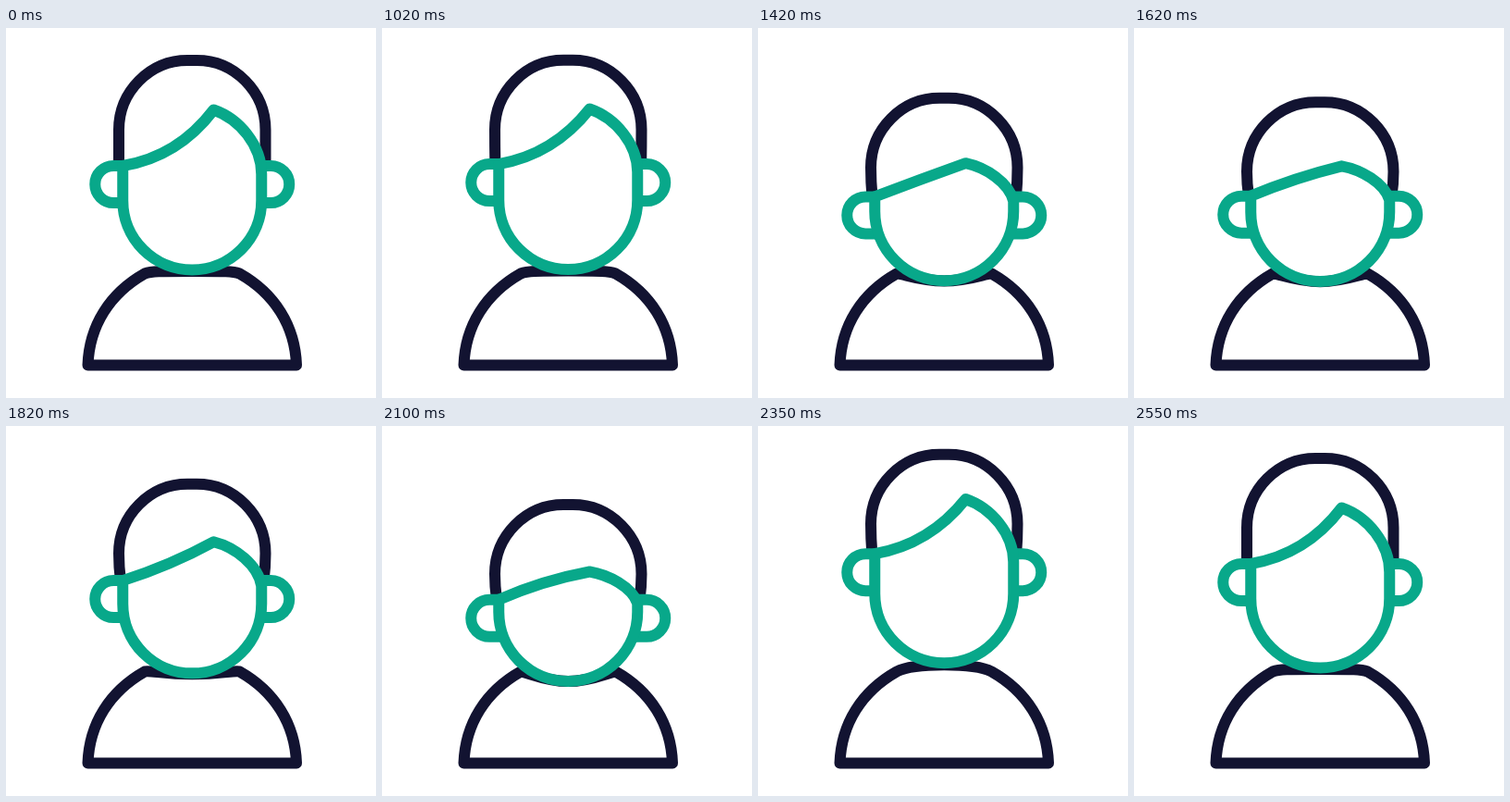
Write an HTML page that moves like this. It is 400 px wide and 400 px high and loops after 2570 ms.

```html
<!DOCTYPE html>
<html lang="en">
<head>
<meta charset="utf-8">
<title>Avatar</title>
<style>
  html, body { margin: 0; width: 100%; height: 100%; overflow: hidden; background: #fff; }
  svg { display: block; width: 100vw; height: 100vh; }
  path { fill: none; stroke-width: 12; stroke-linejoin: round; }
  .dark { stroke: #121331; }
  .green { stroke: #08a88a; }
</style>
</head>
<body>
<svg viewBox="0 0 400 400">
  <path id="body" class="dark"/>
  <path id="hair" class="dark"/>
  <path id="ears" class="green"/>
  <path id="face" class="green"/>
</svg>
<script>
const LOOP = 2570, START = 1020;
const MID = 201.25;

// The head hops, squats, half rises, squats again, hops and settles.
const poses = [
  { at: 1000, squat: 0, hop: 0 },
  { at: 1110, squat: 0, hop: 0.6 },
  { at: 1513, squat: 1, hop: 0 },
  { at: 1805, squat: 0.615, hop: 0.55 },
  { at: 2090, squat: 1, hop: 0 },
  { at: 2360, squat: 0, hop: 1 },
  { at: 2545, squat: 0, hop: 0 }
];

const path = id => document.getElementById(id);
const mix = (a, b, u) => a + (b - a) * u;
const flip = x => 2 * MID - x;
const set = (id, d) => path(id).setAttribute('d', d);
const swing = u => (1 - Math.cos(u * Math.PI)) / 2;
const launch = u => Math.sin(u * Math.PI / 2);

// Vertical offset of a part: how far it sinks, how high it hops, how late it follows
function offset(time, sink, lift, lag) {
  const t = time - lag;
  const next = poses.findIndex(p => p.at > t);
  if (time < START || next < 1) return 0;
  const a = poses[next - 1], b = poses[next];
  const u = (t - a.at) / (b.at - a.at);
  const e = next === 1 ? launch(u) : swing(u);
  return sink * mix(a.squat, b.squat, e) - lift * mix(a.hop, b.hop, e);
}

function drawBody(neck) {
  const dip = neck - 263;
  const y1 = 263 + 0.24 * dip, x2 = 166 + 0.8 * Math.abs(dip);
  set('body', `M88.5 364.5C90 322 112 287 150 265.5
    C157 ${y1} ${x2} ${neck} ${MID} ${neck}
    C${flip(x2)} ${neck} ${flip(157)} ${y1} ${flip(150)} 265.5
    C${flip(112)} 287 ${flip(90)} 322 ${flip(88.5)} 364.5Z`);
}

function drawHair(top, ear, lean) {
  const left = 122, foot = left + lean;
  const side = top + 75, knee = (side + ear) / 2;
  const flat = MID - 5, curve = flat - 41, bend = side - 41;
  set('hair', `M${foot} ${ear}Q${left} ${knee} ${left} ${side}
    C${left} ${bend} ${curve} ${top} ${flat} ${top}H${flip(flat)}
    C${flip(curve)} ${top} ${flip(left)} ${bend} ${flip(left)} ${side}
    Q${flip(left)} ${knee} ${flip(foot)} ${ear}`);
}

function drawEars(y) {
  const x = 116.25;
  set('ears', `M128 ${y}H${x}a20 20 0 0 0 0 40H128
    M${flip(128)} ${y}H${flip(x)}a20 20 0 0 1 0 40H${flip(128)}`);
}

function drawFace(ear, tip, chin) {
  const left = 126.25, right = flip(left), r = right - MID;
  const squash = (tip - ear + 61) / 30;
  const sag = mix(15, -3.5, squash);
  const cx = 175.5 + 0.7 * sag, cy = (ear + tip) / 2 + 1.4 * sag;
  const end = ear + mix(9, 4, squash);
  const x1 = mix(253, 245, squash), y1 = tip + mix(10, 3.5, squash);
  const x2 = right - 6 * squash, y2 = end - mix(31, 18, squash);
  const low = chin - r;
  set('face', `M${left} ${ear}Q${cx} ${cy} 224.5 ${tip}
    C${x1} ${y1} ${x2} ${y2} ${right} ${end}
    V${low}A${r} ${r} 0 0 1 ${left} ${low}Z`);
}

function draw(t) {
  const earOff = offset(t, 39, 11, 0);
  const tipOff = offset(t, 69, 10.5, 10);
  const chinOff = offset(t, 14.5, 5.6, 12);
  const hairOff = offset(t, 50, 5.5, 18);
  const ear = 149 + earOff;
  drawBody(263 + 0.9 * chinOff);
  drawHair(35 + hairOff, ear, Math.min(2, Math.abs(hairOff - earOff) * 0.2));
  drawEars(ear);
  drawFace(ear, 88.5 + tipOff, 261.5 + chinOff);
}

const begin = performance.now();
function tick() {
  draw((performance.now() - begin) % LOOP);
  requestAnimationFrame(tick);
}
draw(0);
requestAnimationFrame(tick);
</script>
</body>
</html>
```
